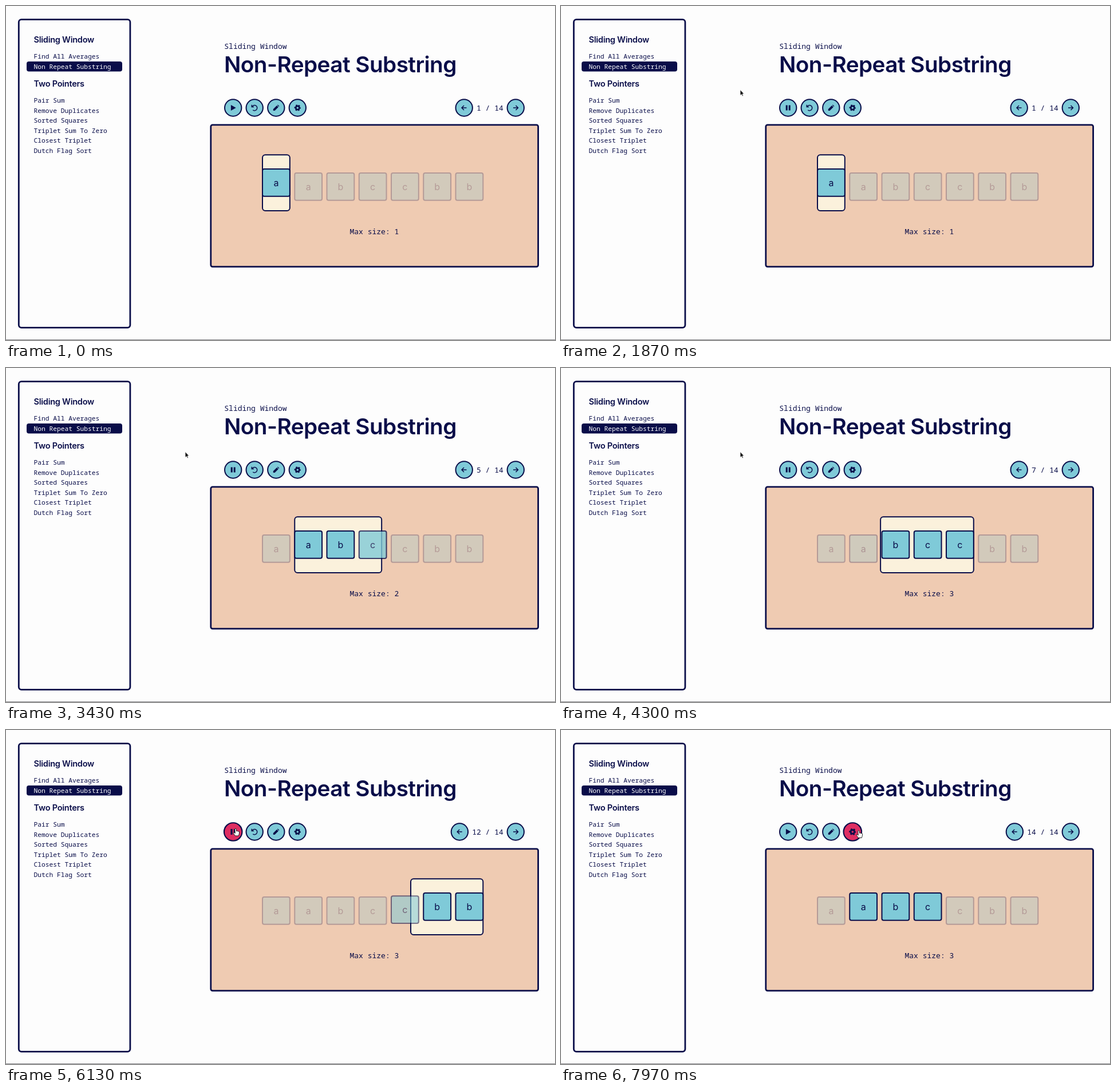
An HTML page that plays this animation: 959 px wide and 584 px high, repeating every 8000 ms.

```html
<!DOCTYPE html>
<html lang="en">
<head>
<meta charset="utf-8">
<title>Non-Repeat Substring</title>
<style>
  html, body { margin: 0; width: 100%; height: 100%; overflow: hidden; background: #fdfdfd; }
  svg { display: block; width: 959px; height: 584px; --navy: #090d49; --blue: #7fcad8; }
  text { fill: var(--navy); white-space: pre; }
  .mono { font: 13px "Noto Sans Mono", monospace; }
  .item { font-size: 11.25px; }
  .head { font: 600 14.5px Inter, sans-serif; letter-spacing: -.016em; }
  .title { font: 600 38.7px Inter, sans-serif; letter-spacing: -.014em; }
  .letter { font: 16px Inter, sans-serif; text-anchor: middle; }
  .tip { font: 7.5px Inter, sans-serif; fill: #222; }
  .box { stroke: var(--navy); stroke-width: 2.8; fill: none; }
  .tile rect, .button circle { fill: var(--blue); stroke: var(--navy); stroke-width: 2; }
  .solid { fill: var(--navy); }
  .line { fill: none; stroke: var(--navy); stroke-width: 1.5; }
</style>
</head>
<body>
<svg id="stage" viewBox="0 0 959 584">
  <rect y="583" width="959" height="1" fill="#85858a"/>
  <rect class="box" x="22.3" y="23.7" width="194.6" height="538.6" rx="4.5"/>
  <rect class="solid" x="36" y="97" width="167" height="17.5" rx="4"/>
  <g id="menu"></g>
  <text class="mono" x="381.3" y="74.5">Sliding Window</text>
  <text class="title" x="381" y="116.3">Non-Repeat Substring</text>
  <rect class="box" x="357.8" y="207.8" width="571.8" height="248" rx="3" style="fill:#efcbb2"/>
  <text class="mono" id="counter" y="182.7" text-anchor="end" x="868.8"></text>
  <g id="buttons"></g>
  <rect id="window" y="260.3" height="97.6" rx="5" fill="#fbf1dc" stroke="#090d49" stroke-width="2"/>
  <g id="tiles"></g>
  <text class="mono" id="max" x="600.5" y="399"></text>
  <g id="tooltip">
    <rect x="400" y="188.3" width="60" height="12" rx="1" fill="#f1f1f1" stroke="#c9c9cc" stroke-width=".8"/>
    <text class="tip" x="402.3" y="197">Start animation</text>
  </g>
  <g id="cursor">
    <path id="arrow" d="M0 0V10L2.3 7.9L3.8 11.2L5.4 10.5L4 7.3H7Z" fill="#111" stroke="#fff" stroke-width=".8"/>
    <path id="hand" d="M-1.2 1Q0-.8 1.1 1L1.6 5Q2.4 3.8 3.4 5Q4.4 4.2 5 5.5Q6.6 5 6.6 7L6.2 10L5.2 13H-.6L-3.6 9Q-4.6 7-2.9 7L-.8 8.6Z" fill="#fff" stroke="#111" stroke-width=".9" stroke-linejoin="round"/>
  </g>
</svg>
<script>
const LOOP = 8000, PLAY = 1570, STEP = 400, LAST = 14;
const LEFT = 448, PITCH = 56.25, SIZE = 47.8;
const $ = id => document.getElementById(id);
const clamp = v => Math.max(0, Math.min(1, v));
const mix = (a, b, p) => a + (b - a) * p;
const easeOut = (v, power = 1.8) => 1 - (1 - clamp(v)) ** power;
const smooth = v => v * v * (3 - 2 * v);
const show = (el, on) => el.style.display = on ? "" : "none";

function add(parent, markup) {
  parent.insertAdjacentHTML("beforeend", markup);
  return parent.lastElementChild;
}

function addMenu(title, y, items, firstY) {
  add($("menu"), `<text class="head" x="48.5" y="${y}">${title}</text>`);
  items.forEach((name, i) => add($("menu"),
    `<text class="mono item" x="48.4" y="${firstY + i * 17.6}">${name}</text>`));
}
addMenu("Sliding Window", 63.7, ["Find All Averages", "Non Repeat Substring"], 92);
$("menu").lastElementChild.style.fill = "#fff";
addMenu("Two Pointers", 140.8, ["Pair Sum", "Remove Duplicates", "Sorted Squares",
  "Triplet Sum To Zero", "Closest Triplet", "Dutch Flag Sort"], 169);

const arrowIcon = '<path class="line" d="M4.3 0H-4M-.2-4L-4.2 0L-.2 4"/>';
const icons = [
  '<path class="solid" id="play" d="M-3.8-4.9L5 0L-3.8 4.9Z"/>' +
    '<path class="solid" id="pause" d="M-4-4.6h3v9.2h-3zM1-4.6h3v9.2h-3z"/>',
  '<path class="line" d="M-4.3-2A4.7 4.7 0 1 1-3 4M-4.9-5.2V-1.6H-1.3"/>',
  '<path class="solid" d="M-5 5V2.3L1.3-4L4-1.3L-2.3 5ZM2.1-4.8L3-5.5L5.5-3L4.8-2.1Z"/>',
  '<circle r="3.1" style="fill:none;stroke-width:2.8"/>' +
    '<circle r="4.6" style="fill:none;stroke-width:2.2" stroke-dasharray="2.41" stroke-dashoffset="1.2"/>',
  arrowIcon,
  `<g transform="scale(-1 1)">${arrowIcon}</g>`
];
const buttonX = [396.7, 434.2, 471.8, 509.3, 800.2, 890.3];
const buttons = icons.map(icon =>
  add($("buttons"), `<g class="button"><circle r="14.7"/>${icon}</g>`));

const tiles = [..."aabccbb"].map((c, i) => add($("tiles"),
  `<g class="tile"><rect x="${LEFT + i * PITCH}" y="284.9" width="${SIZE}" height="${SIZE}" rx="3"/>` +
  `<text class="letter" x="${LEFT + i * PITCH + SIZE / 2}" y="315">${c}</text></g>`));

// First and last letter of the window at steps 1 to 13.
const spans = ["00", "01", "11", "12", "13", "14", "24", "34", "44", "45", "46", "56", "66"]
  .map(s => [...s].map(Number));
const spanAt = step => spans[Math.min(step, LAST - 1) - 1];
const isActive = (i, step) => {
  const [first, last] = step === LAST ? [1, 3] : spanAt(step);
  return i >= first && i <= last;
};

// Pointer stops: time, x, y.
const route = [[780, 620, 590], [1250, 400, 176], [1590, 400, 176], [1800, 313, 146.5],
  [5600, 313, 146.5], [5950, 401, 172], [7250, 401, 172], [7750, 520, 175.5]];

function pointerAt(t) {
  const next = route.findIndex(stop => stop[0] > t);
  if (next <= 0) return next ? route.at(-1).slice(1) : route[0].slice(1);
  const a = route[next - 1], b = route[next];
  const p = smooth((t - a[0]) / (b[0] - a[0]));
  return [mix(a[1], b[1], p), mix(a[2], b[2], p)];
}

function isOver(i, t) {
  const [x, y] = pointerAt(t);
  return Math.hypot(x - buttonX[i], y - 178) < 15.7;
}

// Share of the last 150 ms spent over a button, standing in for a hover transition.
function hoverAt(i, t) {
  let hits = 0;
  for (let k = 0; k < 6; k++) hits += isOver(i, t - k * 25);
  return hits / 6;
}

function drawButtons(t, step) {
  buttons.forEach((button, i) => {
    const hover = i < 4 ? hoverAt(i, t) : 0;
    const x = buttonX[i] - (i === 4 && step > 9 ? 7.8 : 0);
    button.setAttribute("transform", `translate(${x} 178) scale(${1 + .07 * hover})`);
    const [r, g, b] = [[127, 222], [202, 45], [216, 98]].map(c => mix(c[0], c[1], hover));
    button.firstElementChild.style.fill = `rgb(${r},${g},${b})`;
  });
  const playing = t >= PLAY && t < PLAY + LAST * STEP;
  show($("play"), !playing);
  show($("pause"), playing);
}

function drawWindow(step, time) {
  const before = spanAt(Math.max(1, step - 1)), now = spanAt(step), p = easeOut(time);
  const first = mix(before[0], now[0], p), last = mix(before[1], now[1], p);
  const box = $("window");
  box.setAttribute("x", LEFT + first * PITCH);
  box.setAttribute("width", (last - first) * PITCH + SIZE);
  const leaving = step === LAST;
  box.setAttribute("transform", `translate(0 ${leaving ? -50 * p : 0})`);
  box.setAttribute("opacity", leaving ? 1 - clamp(time) : 1);
}

function drawTiles(step, time) {
  tiles.forEach((tile, i) => {
    const from = +isActive(i, Math.max(1, step - 1)), to = +isActive(i, step);
    const lift = mix(from, to, easeOut(time * 4 / 3));
    const glow = mix(from, to, easeOut(time, to ? 1.2 : 1.8));
    tile.setAttribute("transform", `translate(0 ${7 * (1 - lift)})`);
    tile.setAttribute("opacity", mix(.25, 1, glow));
  });
}

function drawPointer(t) {
  const [x, y] = pointerAt(t);
  const over = buttonX.some((_, i) => isOver(i, t));
  show($("cursor"), t >= route[0][0]);
  show($("arrow"), !over);
  show($("hand"), over);
  $("cursor").setAttribute("transform", `translate(${x} ${y})`);
  show($("tooltip"), t >= 6450 && t < 7270);
}

function draw(t) {
  const elapsed = Math.max(0, t - PLAY) / STEP;
  const step = Math.min(LAST, 1 + Math.floor(elapsed));
  const time = elapsed - (step - 1);
  $("counter").textContent = `${step} / ${LAST}`;
  $("max").textContent = `Max size: ${step < 5 ? 1 : step < 6 ? 2 : 3}`;
  drawButtons(t, step);
  drawWindow(step, time);
  drawTiles(step, time);
  drawPointer(t);
}

const start = performance.now();
function tick() {
  draw((performance.now() - start) % LOOP);
  requestAnimationFrame(tick);
}
tick();
</script>
</body>
</html>
```
